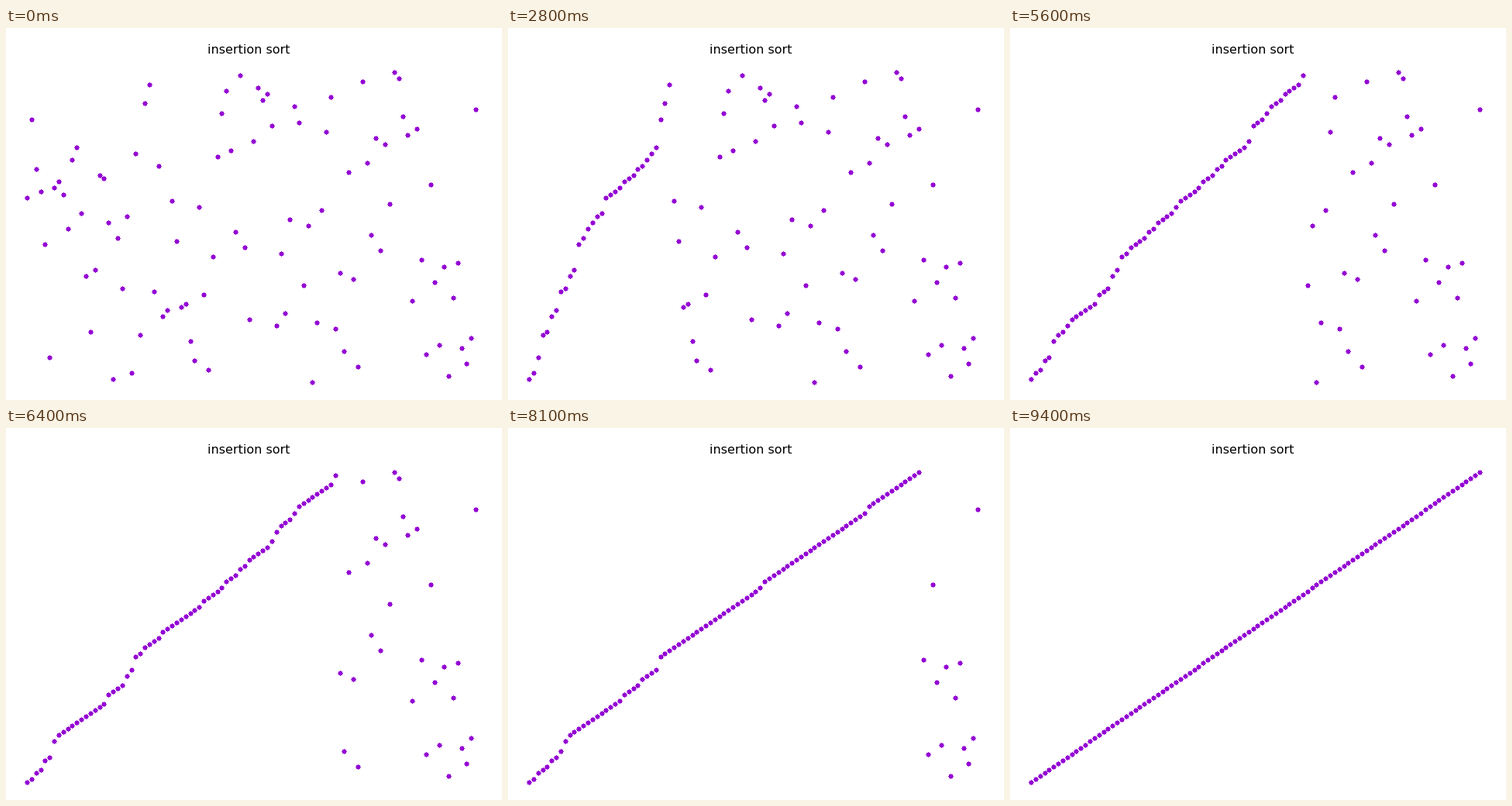
These frames come from a looping animation (640 by 480 pixels, 9500 ms). A matplotlib script:

```python
import matplotlib.pyplot as plt
import numpy as np
from matplotlib.animation import FuncAnimation
from matplotlib.collections import PolyCollection

WIDTH, HEIGHT, DPI = 640, 480, 100
INTERVAL = 100

START = [
    59, 84, 68, 61, 44, 8, 62, 64, 60, 49, 71, 75, 54, 34, 16, 36, 66, 65, 51, 1,
    46, 30, 53, 3, 73, 15, 89, 95, 29, 69, 21, 23, 58, 45, 24, 25, 13, 7, 56, 28,
    4, 40, 72, 86, 93, 74, 48, 98, 43, 20, 77, 94, 90, 92, 82, 18, 41, 22, 52, 88,
    83, 31, 50, 0, 19, 55, 80, 91, 17, 35, 10, 67, 33, 5, 96, 70, 47, 78, 42, 76,
    57, 99, 97, 85, 79, 26, 81, 39, 9, 63, 32, 12, 37, 2, 27, 38, 11, 6, 14, 87,
]


def insertion_states(values):
    """List the array at the start and after every insertion that moves something."""
    values = list(values)
    states = [values[:]]
    for i in range(1, len(values)):
        key, j = values[i], i
        while j > 0 and values[j - 1] > key:
            values[j] = values[j - 1]
            j -= 1
        values[j] = key
        if j < i:
            states.append(values[:])
    return states


def dot_outline():
    """A 5 px square with a one-pixel tip on each side."""
    side = np.array([(2.5, -2.5), (2.5, -0.5), (3.5, -0.5), (3.5, 0.5), (2.5, 0.5)])
    quarter_turn = np.array([(0, 1), (-1, 0)])
    sides = [side]
    for _ in range(3):
        sides.append(sides[-1] @ quarter_turn)
    return np.vstack(sides)


def dot_polygons(values):
    last = len(values) - 1
    x = np.rint(27 + 579 * np.arange(len(values)) / last)
    y = np.rint(457 - 400 * np.array(values) / last)
    centers = np.column_stack([x, y]) + 0.5
    return centers[:, None, :] + DOT


DOT = dot_outline()
STATES = insertion_states(START)

fig = plt.figure(figsize=(WIDTH / DPI, HEIGHT / DPI), dpi=DPI, facecolor="white")
ax = fig.add_axes([0, 0, 1, 1])
ax.set_xlim(0, WIDTH)
ax.set_ylim(HEIGHT, 0)
ax.axis("off")

ax.text(260, 33, "insertion sort", family="DejaVu Sans", size=16 * 72 / DPI,
        color="black", ha="left", va="baseline")
dots = PolyCollection(dot_polygons(START), facecolors="#9400d3", edgecolors="none",
                      linewidths=0, antialiaseds=False, snap=False)
ax.add_collection(dots, autolim=False)


def update(frame):
    dots.set_verts(dot_polygons(STATES[frame]))
    return (dots,)


anim = FuncAnimation(fig, update, frames=len(STATES), interval=INTERVAL,
                     repeat=True, repeat_delay=0)
plt.show()
```
